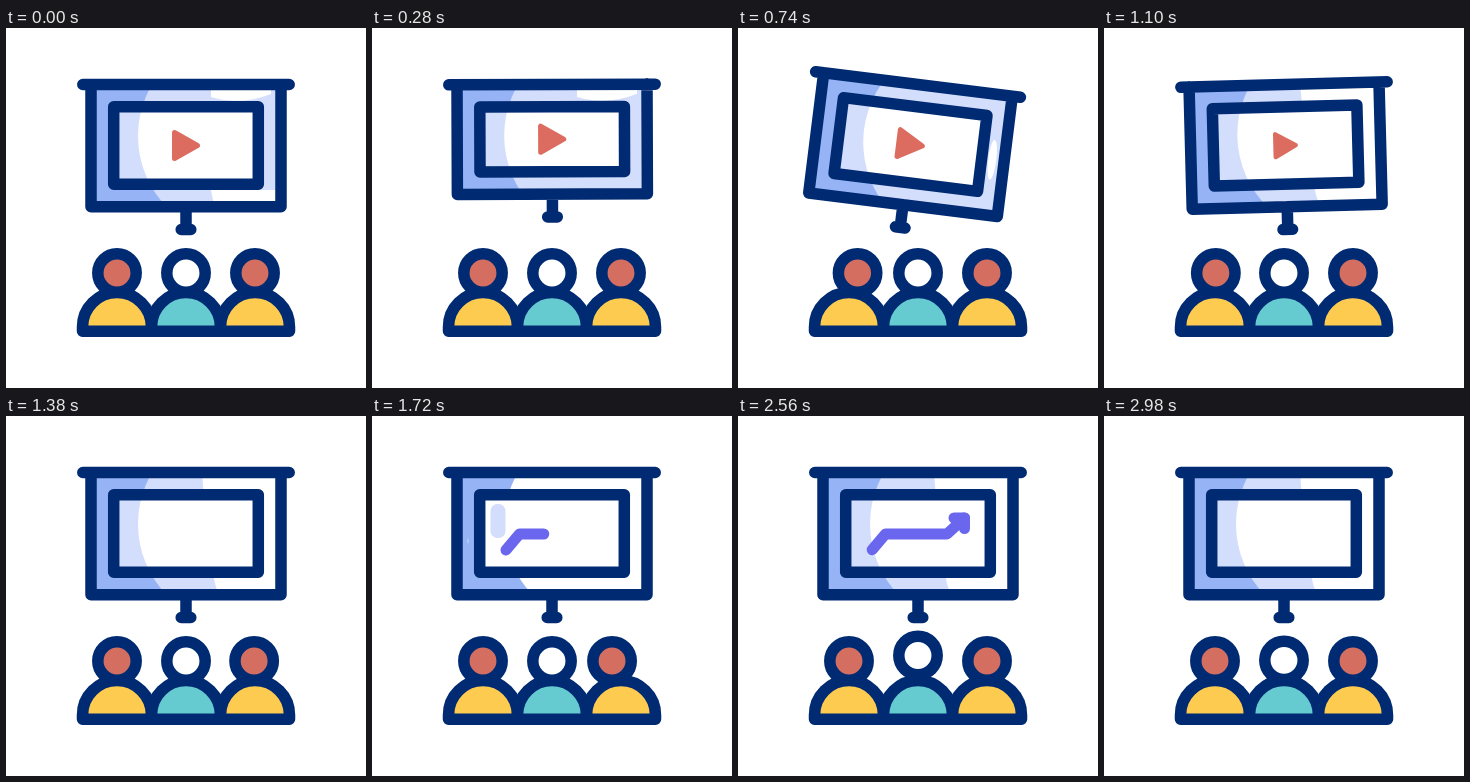
Write an HTML page that moves like this. It is 360x360 px and loops after 3 s.

```html
<!DOCTYPE html>
<html lang="en">
<head>
<meta charset="utf-8">
<title>Presentation</title>
<style>
  html, body { margin: 0; width: 100%; height: 100%; overflow: hidden; background: #fff; }
  svg { display: block; width: 100vw; height: 100vh; }
  .line { fill: none; stroke: #002a72; stroke-width: 11.5; stroke-linecap: round; stroke-linejoin: round; }
  .chart { fill: none; stroke: #6b66ee; stroke-width: 11; stroke-linecap: round; stroke-linejoin: round; }
</style>
</head>
<body>
<svg viewBox="0 0 360 360">
  <defs>
    <clipPath id="outerClip"><rect id="outerArea" x="85" y="56.5" width="190" height="122"/></clipPath>
    <clipPath id="innerClip"><rect id="innerArea" x="107.7" y="78.8" width="144.6" height="77.5"/></clipPath>
  </defs>
  <g id="people"></g>
  <g id="screen">
    <g clip-path="url(#outerClip)">
      <rect x="85" y="56" width="190" height="123" fill="#96b4f5"/>
      <circle id="tint" cx="234" cy="108" r="102"/>
      <path id="wash" fill="#fff"/>
      <path id="patch" fill="#d3ddfc" d="M166 62H226L221 70Q198 66 184 73H164Z"/>
      <ellipse id="glint" fill="#fff"/>
    </g>
    <g clip-path="url(#innerClip)">
      <rect id="innerBase" x="107" y="78" width="146" height="79"/>
      <circle id="innerLight" cx="234" cy="108" r="102" fill="#fff"/>
      <rect id="blob" x="118.5" y="88" width="15" rx="7" fill="#d3ddfc"/>
    </g>
    <path id="frame" class="line"/>
    <path id="play" fill="#dc6c5f" stroke="#dc6c5f" stroke-width="5" stroke-linejoin="round" d="M-11.5-13V13L11.5 0Z"/>
    <path id="trend" class="chart" pathLength="100" d="M134 134L147.5 118H209L226.5 102"/>
    <path id="tip" class="chart" pathLength="100" d="M226.5 112.5V102H216"/>
  </g>
</svg>
<script>
const LOOP = 3000;
const LAVENDER = '#d3ddfc';
const el = id => document.getElementById(id);
const set = (node, attrs) => {
  for (const key in attrs) node.setAttribute(key, attrs[key]);
};
const show = (node, on) => set(node, { visibility: on ? 'visible' : 'hidden' });
const smooth = u => (1 - Math.cos(Math.PI * Math.min(1, Math.max(0, u)))) / 2;
const ramp = (t, from, to) => smooth((t - from) / (to - from));
const during = (t, from, to) => t >= from && t < to;

// Eased interpolation through [time, value] pairs.
function track(t, keys) {
  let value = keys[0][1];
  for (let i = 1; i < keys.length; i++) {
    value += (keys[i][1] - keys[i - 1][1]) * ramp(t, keys[i - 1][0], keys[i][0]);
  }
  return value;
}

const SWING = [[250, 0], [545, -8], [775, 8], [1020, -3], [1180, 0]];
const RETRACT = [[100, 0], [420, 21], [540, 21], [740, 1], [1100, 0]];
const LEFT = [[380, 0], [780, 8.8], [1180, 0]];
const RIGHT = [[1300, 0], [1700, -9], [2100, 0]];
const MIDDLE = [[1900, 0], [2260, -5.5], [2700, -5.5], [3060, 0]];
const PLAY = [[200, 1], [500, 1.03], [1000, 1.03], [1400, 0]];

function person(x, shirt, face) {
  el('people').insertAdjacentHTML('beforeend', `
    <path class="line" style="fill:${shirt}" d="M${x - 34.5} 303.3V299A34.5 34.5 0 0 1 ${x + 34.5} 299V303.3Z"/>
    <circle class="line" style="fill:${face}" cx="${x}" cy="245" r="19.2"/>`);
  return el('people').lastElementChild;
}
const [left, middle, right] = [
  [111, '#fdcb50', '#d46e60'], [180, '#66cbd0', '#fff'], [249, '#fdcb50', '#d46e60']
].map(p => person(...p));

// Shows the stretch from a to b (0..100) of a path.
function trim(path, a, b) {
  show(path, b - a > 0.5);
  set(path, { 'stroke-dasharray': `${b - a} 300`, 'stroke-dashoffset': -a });
}

function washPath(t) {
  if (t < 300) return 'M205 62H265V66Q235 78 205 69ZM205 162H275V178H208Z';
  if (during(t, 600, 900)) return '';
  return 'M196 56H280V180H214Q204 168 196 56Z';
}

function drawScreen(t) {
  const lift = track(t, RETRACT);
  const bottom = 178.7 - lift, inner = 156.2 - lift, foot = 201.5 - lift;
  set(el('screen'), { transform: `rotate(${track(t, SWING)} 180.2 56.5)` });
  set(el('outerArea'), { height: bottom - 56.5 });
  set(el('innerArea'), { height: inner - 78.8 });
  set(el('frame'), {
    d: `M76.8 56.5H283.2M85 56.5V${bottom}H275V56.5` +
       `M107.7 78.8H252.3V${inner}H107.7ZM180 ${bottom}V${foot}M175.2 ${foot}H184.8`
  });

  const bare = during(t, 1400, 2400);
  const pulled = during(t, 400, 600);
  set(el('tint'), { fill: bare || pulled ? '#fff' : LAVENDER });
  set(el('wash'), { d: washPath(t) });
  show(el('patch'), pulled);
  set(el('innerBase'), { fill: bare ? '#fff' : LAVENDER });
  show(el('blob'), bare);
  set(el('blob'), { height: t < 1900 ? 34 : 28 });

  const flash = during(t, 640, 860);
  const grow = ramp(t, 1600, 2200);
  show(el('glint'), flash || bare);
  set(el('glint'), flash
    ? { cx: 263, cy: 122, rx: 4, ry: 20 }
    : { cx: 96, cy: 125, rx: 3 * grow, ry: 26 * grow });

  const size = track(t, PLAY);
  show(el('play'), size > 0.01);
  set(el('play'), { transform: `translate(180 ${117.5 - lift / 2}) scale(${size})` });

  const drawn = Math.min(100, Math.max(0, (t - 1456) / 6.2));
  trim(el('trend'), 100 * ramp(t, 2550, 2850), drawn);
  trim(el('tip'), 100 * ramp(t, 2780, 2900), Math.min(100, Math.max(0, (t - 2040) / 1.2)));
}

function render(t) {
  drawScreen(t);
  set(left, { transform: `translate(${track(t, LEFT)} 0)` });
  set(right, { transform: `translate(${track(t, RIGHT)} 0)` });
  set(middle, { transform: `translate(0 ${track(t, MIDDLE)})` });
}

let start;
function tick(now) {
  start ??= now;
  render((now - start) % LOOP);
  requestAnimationFrame(tick);
}
render(0);
requestAnimationFrame(tick);
</script>
</body>
</html>
```
